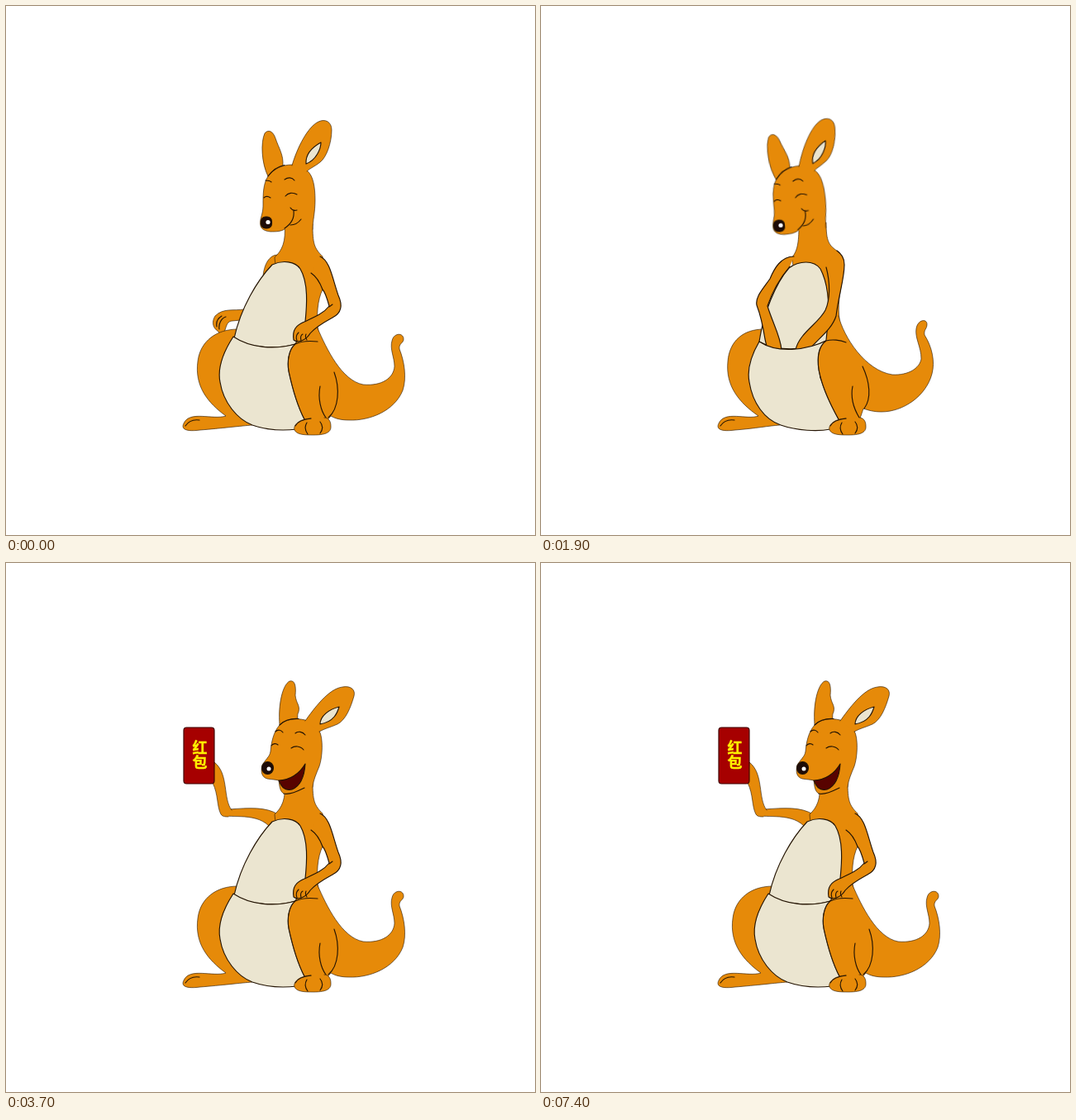
These frames come from a looping animation (640 by 640 pixels, 8.7 s). An HTML page without scripts:

```html
<!DOCTYPE html>
<html lang="zh">
<head>
<meta charset="utf-8">
<title>Kangaroo</title>
<style>
:root {
  --t: 8.7s;
  /* leaning forward, one stair per 100 ms */
  --lean: linear(0 0% 7.69%, .15 7.69% 15.38%, .3 15.38% 30.76%, .52 30.76% 38.46%,
    .67 38.46% 46.15%, .78 46.15% 53.84%, .86 53.84% 61.53%, .92 61.53% 69.23%,
    .96 69.23% 76.92%, .98 76.92% 99.9%, 1 100%);
}
html, body { margin: 0; width: 100%; height: 100%; overflow: hidden; background: #fff; }
svg { display: block; width: 100vw; height: 100vh; }
path, ellipse, circle, rect { stroke: #241403; stroke-width: 1.15; stroke-linecap: round; stroke-linejoin: round; }
.o { fill: #e68a09; }
.c { fill: #ebe5d0; }
.n { fill: none; }
.w { fill: #fff; }
.k { fill: #1d0b07; }
.m { fill: #580300; }
.thin { stroke-width: .6; }
.glint { fill: #fff; stroke: none; }
.card { fill: #a60000; stroke: #3d0000; }
text { font: 700 18px "Noto Sans CJK SC", "Noto Sans CJK", sans-serif; fill: #fff000; stroke: #fff000; stroke-width: .4; text-anchor: middle; }

/* poses that switch hard */
.show { animation: var(--t) step-end infinite; }
.start { animation-name: start; }
.hip { animation-name: hip; }
.reach { animation-name: reach; }
.smile { animation-name: smile; }
.wow { animation-name: wow; }
.laugh { animation-name: laugh; }
@keyframes start { 0%, 83.908% { visibility: visible } 1.149%, 85.057% { visibility: hidden } }
@keyframes hip { 0%, 34.482% { visibility: visible } 1.149% { visibility: hidden } }
@keyframes reach { 0%, 34.482% { visibility: hidden } 1.149% { visibility: visible } }
@keyframes smile { 0%, 83.908% { visibility: visible } 28.735%, 85.057% { visibility: hidden } }
@keyframes wow { 0%, 34.482% { visibility: hidden } 28.735% { visibility: visible } }
@keyframes laugh { 0%, 83.908% { visibility: hidden } 34.482%, 85.057% { visibility: visible } }

/* parts that lean */
.lean { animation: var(--t) var(--lean) infinite; }
#head { animation-name: head; transform-origin: 315px 261px; }
@keyframes head {
  0%, 34.482%, 100% { transform: translate(0, 0) rotate(0deg) }
  14.943%, 34.481% { transform: translate(-27px, 4px) rotate(-5.7deg) }
}
#leg { animation-name: leg; }
@keyframes leg {
  0%, 34.482%, 100% { d: path("M280 391C255 391 235 405 232 430C228 460 244 480 266 496C250 501 222 489 215 505C211 513 220 515 235 513C260 511 285 508 298 507L300 450") }
  14.943%, 34.481% { d: path("M269 391C245 391 228 405 226 430C223 460 240 480 263 496C249 501 222 489 215 505C211 513 220 515 235 513C260 511 275 508 289 507L290 450") }
}
#torso { animation-name: torso; }
@keyframes torso {
  0%, 34.482%, 100% { d: path("M337 264C339 285 334 296 325 304C330 340 310 380 300 402L345 440L378 395C375 375 377 355 383 343L386 330L383 303C373 293 371 288 371 264") }
  14.943%, 34.481% { d: path("M312 266C312 287 310 297 303 305C310 325 300 365 290 406L340 440L363 390C358 370 361 350 363 340L366 318L361 298C348 290 345 285 345 262") }
}
#belly { animation-name: belly; }
@keyframes belly {
  0%, 34.482%, 100% { d: path("M276 402C284 365 304 332 322 313C335 307 350 309 356 318C366 335 364 362 362 382C359 395 352 405 350 409C330 415 296 415 276 402Z") }
  14.943%, 34.481% { d: path("M264 406C269 372 284 335 300 317C312 308 330 307 338 318C347 335 349 360 347 385C346 395 345 403 345 405C320 418 285 418 264 406Z") }
}
#pouch { animation-name: pouch; }
@keyframes pouch {
  0%, 34.482%, 100% { d: path("M275 400C262 420 256 440 259 455C263 480 280 500 298 507C315 513 335 514 352 512L365 500L345 450L342 425L350 409C325 416 296 414 275 400Z") }
  14.943%, 34.481% { d: path("M264 406C253 425 249 440 252 455C256 480 270 500 290 507C310 514 335 515 350 512L365 500L338 450L336 425L349 403C320 418 285 420 264 406Z") }
}
#tail { animation-name: tail; }
@keyframes tail {
  0%, 34.482%, 100% { d: path("M377 390C388 415 406 453 432 458C455 460 469 450 470 436C470 425 464 415 467 405C469 395 481 395 481 403C481 408 475 408 476 415C482 430 485 450 480 465C470 490 440 502 415 501C405 501 398 499 393 496L388 502L362 502C353 485 347 465 342 442C340 430 342 415 350 409") }
  14.943%, 34.481% { d: path("M360 375C366 400 392 441 425 446C445 447 458 438 460 427C460 412 452 402 454 390C456 379 467 378 467 385C467 391 463 391 464 398C473 412 477 430 473 445C466 472 438 491 412 491C402 491 396 489 390 487L385 502L361 502C350 482 340 462 336 440C334 425 335 412 345 405") }
}
#lines { animation-name: lines; }
@keyframes lines {
  0%, 34.482%, 100% { d: path("M377 406C368 405 358 405 350 409C342 415 340 430 342 442C347 465 353 485 361 500M397 443C404 462 403 487 390 498M380 460C377 475 381 490 387 498") }
  14.943%, 34.481% { d: path("M369 407C362 404 352 403 345 405C335 412 334 425 336 440C340 462 350 482 360 500M389 436C398 455 400 475 391 487M377 460C374 475 379 488 385 498") }
}
#armL { animation-name: armL; }
@keyframes armL {
  0% { d: path("M333 300C314 303 306 318 295 330C280 343 266 346 271 356C278 375 276 390 274 403L274 416L288 415C287 400 288 372 284 352C292 342 308 322 320 313") }
  14.943%, 100% { d: path("M306 303C290 303 282 318 277 330C268 343 259 352 261 362C266 375 269 390 271 403L274 416L291 416C290 400 280 383 274 363C280 345 290 328 301 315") }
}
#armR { animation-name: armR; }
@keyframes armR {
  0% { d: path("M363 322C374 348 378 362 373 374C348 391 342 394 342 410L352 411C358 404 368 393 381 384C384 376 389 343 388 318C388 309 386 303 382 300") }
  14.943%, 100% { d: path("M345 316C350 335 350 355 344 368C336 384 312 396 308 416L326 414C336 402 352 391 357 375C360 350 367 330 367 313C367 304 363 300 358 296") }
}
#dig { animation: dig var(--t) steps(3) infinite; }
@keyframes dig {
  0%, 14.943%, 21.839%, 28.735% { transform: translate(0, 0) }
  18.391%, 25.287%, 32.183%, 100% { transform: translate(2px, 0) }
}
#wave { transform-origin: 264px 302px; animation: wave var(--t) steps(7) infinite; }
@keyframes wave { 0%, 34.482% { transform: rotate(-27deg) } 42.528%, 100% { transform: rotate(0deg) } }
</style>
</head>
<body>
<svg viewBox="0 0 640 640">
  <g class="show start o">
    <path class="thin" d="M330 301C318 300 312 314 311 327L325 330"/>
    <path class="thin" d="M288 367C275 369 263 365 253 375C248 383 251 390 256 393C259 398 264 398 265 392C267 386 268 381 274 381L284 380"/>
    <path class="n" d="M266 376C260 378 257 385 258 391M261 375C256 378 254 383 255 388"/>
  </g>
  <g class="show laugh">
    <path class="o thin" d="M329 304C315 295 295 296 270 298L261 303C265 311 300 300 318 318L329 318"/>
    <g id="wave">
      <path class="o thin" d="M273 299C262 285 270 255 252 241L250 266C257 280 255 295 260 304C262 307 265 307 269 307"/>
      <rect class="card" x="215" y="199" width="37" height="68" rx="3.5"/>
      <text><tspan x="234.5" y="230">红</tspan><tspan x="234.5" y="248">包</tspan></text>
    </g>
  </g>

  <path id="leg" class="lean o thin"/>
  <path class="n" d="M217 508C221 502 227 500 234 501"/>
  <path id="torso" class="lean o thin"/>
  <path id="belly" class="lean c"/>
  <g class="show reach">
    <g id="dig"><path id="armL" class="lean o"/></g>
    <path id="armR" class="lean o"/>
  </g>
  <path id="pouch" class="lean c"/>
  <path id="tail" class="lean o thin"/>
  <path id="lines" class="lean n"/>
  <path class="o thin" d="M369 499C358 499 347 505 349 513C352 519 362 519 372 519C384 519 394 517 393 508C393 502 390 498 385 498"/>
  <path class="n" d="M369 499C360 500 353 502 350 508M364 504C361 509 362 514 365 518M380 503C384 508 383 513 380 517"/>

  <g class="show hip">
    <path class="o" d="M380 303C392 308 395 330 402 350C408 363 405 372 395 377C384 383 374 389 368 396C364 403 354 409 348 404C346 392 351 386 361 382C374 376 384 372 391 363C388 352 385 345 383 343C380 335 375 327 369 323"/>
    <path class="n" d="M391 364L395 361M352 405C350 400 352 397 354 395M357 405C356 401 357 398 359 397M364 404C362 401 362 399 363 397"/>
  </g>

  <g class="show smile"><g id="head" class="lean">
    <path class="o thin" d="M317 206C309 190 308 165 313 154C317 149 323 151 326 160C330 172 336 180 335 193"/>
    <path class="o thin" d="M337 270C333 273 326 273 320 273C310 272 306 268 308 258C310 250 311 248 311 240C311 228 311 215 317 206C324 197 334 192 346 192C355 192 360 195 364 199C372 205 374 220 374 235C374 250 371 260 371 270"/>
    <path class="n" d="M317 206C322 199 329 194 337 192.5"/>
    <path class="o thin" d="M346 193C352 172 365 146 378 140C386 136 394 140 394 150C394 165 388 183 380 189C374 194 368 196 364 200"/>
    <path class="c" d="M363 191C362 178 372 170 381 165C381 172 376 186 363 191Z"/>
    <path class="n" d="M338 230C341 226 347 225 352 228M337 210C341 207 346 207 349 211M312 232C314 230 317 230 320 232M314 211C316 211 319 211 321 213M344 244C346 247 349 248 352 247M348 248C349 256 346 263 337 269M344 265C350 265 354 262 357 258"/>
    <rect class="k" x="308.5" y="255" width="13" height="14" rx="5.5"/>
    <circle class="glint" cx="317" cy="261.5" r="2.6"/>
  </g></g>

  <g class="show wow">
    <path class="o thin" d="M296 199C291 178 292 152 302 144C308 140 311 148 311 158C314 168 318 172 317 180L316 189"/>
    <path class="o thin" d="M311 284L314 282C307 279 304 273 303 265C288 266 280 262 279 254C279 247 284 243 287 238C288 222 290 207 296 199C304 190 315 187 327 188C336 189 341 194 345 199C351 210 351 225 350 240C348 253 345 260 345 272"/>
    <path class="n" d="M296 199C302 192 309 189 318 188"/>
    <path class="o thin" d="M327 189C335 172 352 147 369 143C379 140 384 146 381 154C378 168 370 184 362 191C356 196 352 196 345 200"/>
    <path class="c" d="M344 191C344 182 350 173 366 167C364 174 357 190 344 191Z"/>
    <path class="n" d="M293 206C296 203 299 204 300 207M316 206C320 203 325 204 328 207M303 265C304 273 307 280 314 282C322 281 325 276 323 266"/>
    <ellipse class="w" cx="295.500" cy="222" rx="8.5" ry="9.5"/>
    <ellipse class="w" cx="320.500" cy="224" rx="10" ry="11.5"/>
    <circle class="k" cx="296.500" cy="227" r="2"/>
    <circle class="k" cx="317" cy="228" r="2.5"/>
    <path class="m" d="M305 264C312 262 318 263 320 267C322 272 320 277 315 277C309 276 308 270 305 264Z"/>
    <ellipse class="k" cx="286.500" cy="252" rx="7" ry="6.5"/>
    <circle class="glint" cx="289" cy="252" r="2.5"/>
  </g>

  <g class="show laugh">
    <path class="o thin" d="M331 196C329 170 335 147 343 143C350 141 351 150 350 160C351 170 356 172 354 180C352 184 353 186 353 190"/>
    <path class="o thin" d="M336 279C331 276 331 270 330 263C326 262 322 262 316 261C309 259 308 252 310 245C313 238 319 235 320 228C321 218 323 205 331 196C338 189 350 187 362 190C369 193 375 198 379 203C384 212 383 235 379 246C375 256 372 262 371 271"/>
    <path class="n" d="M331 196C337 190 345 188 354 188.5"/>
    <path class="o thin" d="M362 191C372 177 390 152 407 150C418 148 423 154 421 161C417 175 411 190 401 195C392 199 386 200 379 204"/>
    <path class="c" d="M380 195C380 185 391 177 403 174C401 181 397 192 380 195Z"/>
    <path class="n" d="M345 224C349 221 356 221 360 226M350 206C353 203 359 204 362 208M321 221C323 218 327 218 329 220M326 204C329 201 333 202 335 205M336 279C345 281 355 275 361 272"/>
    <path class="m" d="M330 263C343 263 355 255 362 243C361 258 356 270 346 274C336 276 333 270 330 263Z"/>
    <ellipse class="k" cx="316.5" cy="248" rx="7" ry="7.5"/>
    <circle class="glint" cx="318" cy="249" r="2.5"/>
  </g>
</svg>
</body>
</html>
```
